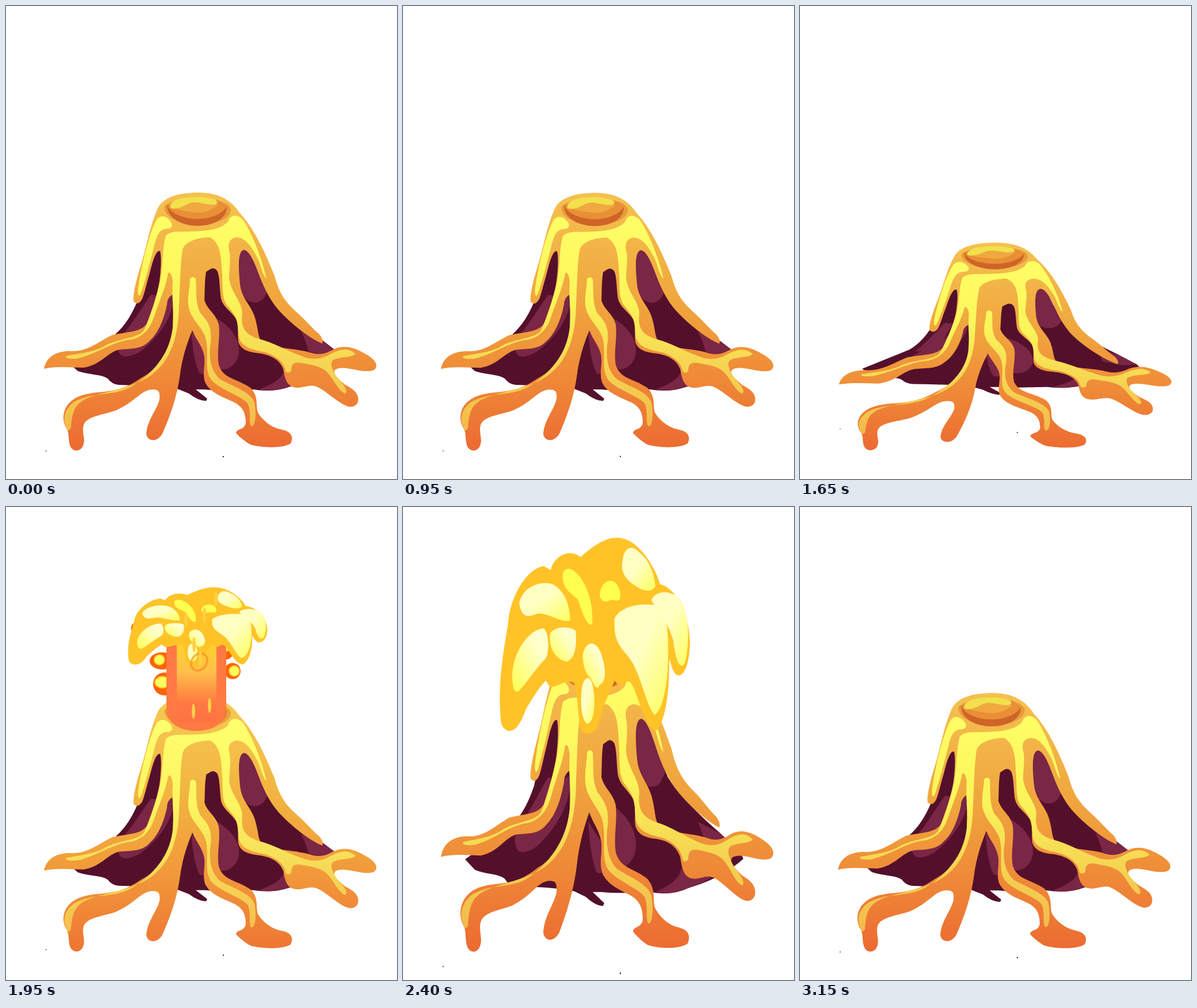
Recreate the animation shown at these times as an HTML page. Size 680 by 824 pixels, loop 3.2 s.

```html
<!DOCTYPE html>
<html lang="en">
<head>
<meta charset="utf-8">
<title>Volcano</title>
<style>
html, body { margin: 0; width: 100%; height: 100%; overflow: hidden; background: #fff; }
svg { display: block; width: 100%; height: 100%; }
</style>
</head>
<body>
<svg viewBox="0 0 680 824">
  <defs>
    <linearGradient id="lavaFill" gradientUnits="userSpaceOnUse" x1="0" y1="325" x2="0" y2="770">
      <stop offset="0"/><stop offset=".4"/><stop offset=".7"/><stop offset="1"/>
    </linearGradient>
    <linearGradient id="shineFill" gradientUnits="userSpaceOnUse" x1="0" y1="360" x2="0" y2="745">
      <stop offset="0"/><stop offset=".4"/><stop offset=".7"/><stop offset="1"/>
    </linearGradient>
    <linearGradient id="jetFill" x1="0" y1="0" x2="0" y2="1">
      <stop offset="0" stop-color="#ffd22e"/><stop offset=".35" stop-color="#ffc04a"/><stop offset=".75" stop-color="#ff7a42"/><stop offset="1" stop-color="#ff7242"/>
    </linearGradient>
    <linearGradient id="paleFill" x1="1" y1="0" x2="0" y2="1">
      <stop offset=".3" stop-color="#ffffcc"/><stop offset="1" stop-color="#ffff50"/>
    </linearGradient>
    <linearGradient id="paleFill2" x1="0" y1="0" x2="1" y2="1">
      <stop offset=".45" stop-color="#ffffc4"/><stop offset="1" stop-color="#ffff5c"/>
    </linearGradient>
  </defs>

  <g id="rock">
    <path fill="#54102b" d="M262 385C250 425 240 470 228 515C220 535 208 556 190 572L108 621L125 636C145 643 165 641 177 649Q184 659 196 660C230 661 265 661 298 667L318 675Q335 688 348 688L350 684L330 668L345 668C380 671 405 668 430 668Q465 674 497 662Q555 648 592 620L586 610L550 582Q522 562 500 543Q476 524 460 502L440 457Q430 425 420 385Z"/>
    <g fill="#7a2645">
      <path d="M398 410C402 470 404 495 414 507C424 520 442 519 449 508L456 496L440 455L425 410Z"/>
      <path d="M513 567L552 584L586 610L560 612L526 602Q523 586 513 567Z"/>
      <path d="M440 668C465 658 480 650 484 634L540 645Q520 656 497 662Q465 674 440 668Z"/>
      <path d="M362 542C393 558 410 585 404 610C398 629 380 638 368 630Z"/>
      <path d="M322 566L345 596L352 636Q345 643 337 640Q326 620 322 566Z"/>
      <path d="M293 500C292 540 268 572 244 593C228 609 205 615 199 607Q193 600 195 588L250 545L280 505Z"/>
      <path d="M252 503L226 542Q212 562 200 577L240 570L266 505Z"/>
    </g>
    <path id="speckL" fill="#54102b" d="M69 774.500h1.500v1.500h-1.500z"/>
    <path fill="#54102b" d="M377 784h2v2h-2z"/>
  </g>

  <g id="lava">
    <path fill="url(#lavaFill)" d="M262 357C270 333 300 325 335 325C372 325 393 340 406 360C432 388 450 428 467 470C475 500 485 515 505 533C520 546 533 562 545 572Q553 582 550 588C530 580 500 557 480 536C462 518 450 495 440 468C430 440 421 424 413 425C403 428 404 455 407 485C410 510 425 520 432 540C440 565 437 575 445 585C460 597 500 595 530 604C550 610 560 603 572 597C590 590 606 595 625 606C645 617 648 628 640 634C620 642 590 624 573 633C566 640 578 650 590 660C605 668 615 675 612 690C605 704 590 697 580 690C565 680 552 668 540 663C525 658 515 668 500 664C485 660 484 640 482 632C475 615 460 608 440 605C420 603 408 598 404 585C402 570 406 560 400 545C390 530 378 525 374 510C371 490 372 470 367 461Q362 455 356 458L348 463C345 480 346 500 345 512C350 530 365 535 370 555C373 580 366 600 370 625C378 650 400 648 425 665C440 680 434 695 438 708C446 722 462 735 480 738C498 742 500 752 495 762C480 772 440 769 425 764C415 758 405 750 400 744C402 735 413 740 417 727C417 712 414 700 398 691C380 682 355 675 346 655C340 635 350 620 342 600C336 585 330 580 324 565C318 580 308 605 303 640C298 680 285 715 272 745C262 762 245 758 244 745C246 720 262 705 267 685C268 672 266 668 255 668C235 668 225 690 190 705C165 713 140 715 135 730C131 745 140 755 133 768C128 777 115 777 111 765C108 755 110 745 106 737C98 725 98 710 105 698C115 683 130 676 160 673C195 670 210 665 235 648C265 633 285 600 290 560C291 540 292 520 289 503C284 506 280 512 280 520C275 545 265 570 250 583C235 600 215 596 195 599C175 605 165 625 135 630C110 630 90 627 66 632C70 612 85 602 110 601C140 604 160 585 185 573C215 567 235 568 245 553C255 525 265 500 268 470C270 450 270 435 268 427C262 424 256 440 250 465C244 485 241 500 237 510Q230 523 222 515C220 505 226 480 232 460C245 420 248 390 262 357Z"/>
    <g fill="url(#shineFill)">
      <path d="M262 372C270 362 281 367 288 378Q291 388 280 388C266 388 262 402 258 417C252 442 244 472 236 497C232 510 228 505 230 490C236 450 248 398 262 372Z"/>
      <path d="M278 400Q285 393 300 393C340 393 370 392 386 376C390 362 402 362 412 372C430 400 445 440 453 475C447 470 444 455 438 440C425 415 415 403 400 403C390 405 385 412 388 425C392 440 388 455 388 475C392 500 410 515 411 535C408 560 415 572 440 580C470 588 490 602 520 612C540 618 555 612 565 606C580 598 595 594 608 606C600 613 585 610 570 616C560 622 570 640 580 652C590 662 595 672 590 675C580 672 572 655 562 642C552 628 535 626 515 622C495 618 497 630 496 636Q490 642 486 636C484 620 470 610 450 603C420 598 405 590 404 570C403 545 400 540 385 522C375 510 377 490 376 470C374 440 375 415 355 403C330 403 310 412 307 425C303 450 303 480 301 520C300 580 285 620 250 645C220 665 180 670 150 680C120 690 115 705 113 735Q108 745 104 732C97 715 105 700 118 690C150 672 185 680 215 665C250 645 285 610 290 560C292 530 288 500 290 480Q288 462 282 465C278 490 268 510 258 540C250 565 235 580 210 582C180 588 160 605 125 614Q103 616 104 610C120 606 150 604 170 593C195 578 230 580 240 565C252 540 262 505 268 480C273 450 272 420 278 400Z"/>
      <path d="M320 475Q325 469 330 475C332 495 328 515 338 535C352 550 358 560 356 585C352 610 355 635 372 650C395 663 425 672 432 690C436 710 434 732 427 732C421 728 427 705 420 692C408 678 370 668 356 650C343 630 355 600 346 575C338 555 320 545 317 520C316 500 320 490 320 475Z"/>
    </g>
    <path fill="#e89a38" d="M275 350Q279 344 290 341Q332 325 376 341Q390 346 391 355C388 390 277 390 275 350Z"/>
    <path fill="#cf6428" d="M280 347C281 395 386 394 384 349Z"/>
    <path fill="#e98f35" d="M281 349Q300 333 332 332Q370 334 384 349C368 378 298 378 281 349Z"/>
    <path fill="#f0a840" d="M288 352Q315 342 336 343L370 346C360 354 350 360 332 360Q310 358 288 352Z"/>
    <path fill="#f2e04c" d="M286 352Q283 343 300 336Q335 328 364 337Q372 344 362 346C345 347 335 339 318 344Q303 353 290 353Z"/>
    <path id="craterGlow" fill="#ffe23c" d="M275 350Q279 344 290 341Q332 325 376 341Q390 346 391 355C388 390 277 390 275 350Z"/>
  </g>

  <g id="bombs"></g>

  <g id="jet">
    <path id="jetSide" fill="#ff7a42"/>
    <rect id="jetCore" x="297" width="69" fill="url(#jetFill)"/>
  </g>

  <g id="cloud">
    <path fill="#ffc327" d="M170 190C165 160 172 130 183 95C185 70 215 40 245 38L257 42C262 28 290 20 309 29C330 18 355 8 378 10C410 12 440 40 447 56C475 60 498 85 499 115C498 140 485 150 475 146C468 142 466 135 463 130C464 165 455 195 440 202C425 200 415 180 405 165C398 152 390 150 385 156Q378 160 368 152C360 165 350 172 343 190C335 208 312 210 307 195C304 180 303 165 298 155C285 148 270 160 255 158L248 152C235 160 225 170 214 180C205 195 195 203 183 202C174 200 170 196 170 190Z"/>
    <g fill="url(#paleFill2)">
      <path d="M202 75C208 58 240 52 260 56C280 62 290 75 291 92C275 95 255 85 235 85C222 88 207 92 202 75Z"/>
      <path d="M382 32C385 18 400 17 410 24C425 30 436 42 439 58C430 66 415 62 400 56C385 50 378 42 382 32Z"/>
      <path d="M432 72C440 60 475 62 487 75C497 90 499 115 490 135C480 142 474 130 470 112C462 95 445 85 432 72Z"/>
      <path d="M368 90C380 76 425 74 445 78C460 88 462 105 461 130C460 160 450 182 438 186C425 180 418 155 400 135C385 120 365 118 368 90Z"/>
      <path d="M311 160C314 147 327 145 331 160C336 180 330 195 320 195C310 190 308 175 311 160Z"/>
    </g>
    <g fill="url(#paleFill)">
      <path d="M190 150C188 125 220 100 245 100C255 105 254 125 248 130C230 140 215 155 200 163C192 163 191 158 190 150Z"/>
      <path d="M256 105C265 97 290 98 300 102C303 115 300 130 285 133C270 132 252 122 256 105Z"/>
      <path d="M313 125C320 110 340 112 347 130C355 145 350 155 342 156C335 165 330 150 322 147C314 140 312 132 313 125Z"/>
    </g>
    <g fill="#ffff50">
      <path d="M278 45C285 36 300 42 312 52C325 65 331 80 329 96C320 98 312 85 305 72C295 65 275 62 278 45Z"/>
      <path d="M342 68C343 52 365 48 374 58C382 68 378 74 368 72C358 70 350 78 342 68Z"/>
    </g>
  </g>

  <g id="sparks">
    <ellipse id="ring" cx="336" rx="13" ry="16" fill="none" stroke="#f08a20" stroke-opacity=".6" stroke-width="4"/>
  </g>
</svg>

<script>
const LOOP = 3200, STEP = 50;
const $ = id => document.getElementById(id);
const mix = (a, b, p) => a + (b - a) * p;

// Rows of [time, value, value...], read with straight lines between them.
function sample(rows, t) {
  let i = 1;
  while (i < rows.length - 1 && rows[i][0] < t) i++;
  const a = rows[i - 1], b = rows[i];
  const p = Math.min(1, Math.max(0, (t - a[0]) / (b[0] - a[0])));
  return a.slice(1).map((v, n) => mix(v, b[n + 1], p));
}

// time, lava height, rock height
const SQUASH = [
  [1000, 1, 1], [1100, .973, .965], [1250, .93, .875], [1650, .805, .677],
  [1700, .8, .67], [1800, .87, .78], [2000, 1.03, 1.03], [2200, 1.126, 1.155],
  [2300, 1.185, 1.25], [2400, 1.161, 1.21], [2750, 1.045, 1.07], [3150, 1.002, 1], [3200, 1, 1]
];
// time, width, top, height
const CLOUD = [
  [1750, .3, 330, .3], [1900, .65, 180, .6], [2050, .9, 60, .9], [2200, 1, 10, 1],
  [2250, 1, 8, 1.05], [2300, 1, 22, 1.3], [2400, 1, 54, 1.75], [2500, .9, 150, 1.4], [2600, .6, 290, .6]
];
// x, y, rx, ry, core dx, core dy, core rx, core ry
const BOMBS = [
  [100, 263, 27, 16, -10, -2, 12, 9], [173, 415, 22, 15, -5, -2, 9, 9],
  [184, 522, 20, 20, -4, -3, 13, 10], [557, 237, 10, 9, 0, -6, 9, 9],
  [467, 361, 15, 18, -1, -5, 9, 9], [499, 462, 14, 14, 3, 0, 9, 9]
];
// x, height above the crater lip
const SPARKS = [[301, 103], [328, 101], [365, 86], [313, 50], [345, 57], [327, 6], [338, 253], [354, 170], [326, 160]];

const LAVA = [["#f5c150", "#f9e05c"], ["#f0a83e", "#f7cb46"], ["#ef8c38", "#f5b53e"], ["#ec6b32", "#f4903a"]];
const SHINE = [["#ffff66", "#ffff80"], ["#fbf45a", "#fdf66c"], ["#f5d452", "#f9e45e"], ["#f2b84a", "#f7cc50"]];

function blend(pair, p) {
  const [a, b] = pair.map(c => [1, 3, 5].map(i => parseInt(c.substr(i, 2), 16)));
  return `rgb(${a.map((v, i) => Math.round(mix(v, b[i], p)))})`;
}
function tint(id, pairs, p) {
  pairs.forEach((pair, i) => $(id).children[i].setAttribute("stop-color", blend(pair, p)));
}
function add(parent, name, attrs) {
  const el = document.createElementNS("http://www.w3.org/2000/svg", name);
  for (const k in attrs) el.setAttribute(k, attrs[k]);
  return parent.appendChild(el);
}
function show(id, on) { $(id).setAttribute("visibility", on ? "visible" : "hidden"); }

const bombs = BOMBS.map(([, , rx, ry, dx, dy, cx, cy]) => {
  const g = add($("bombs"), "g", {});
  add(g, "ellipse", { rx, ry, fill: "#ff6200" });
  add(g, "ellipse", { cx: dx, cy: dy, rx: cx, ry: cy, fill: "#ffff5c", stroke: "#ffc02c", "stroke-width": 2 });
  return g;
});
const sparks = SPARKS.map(([cx]) => add($("sparks"), "ellipse", { cx, rx: 3, ry: 13, fill: "#ffd045" }));

function pose(t) {
  if (t >= 1000) return sample(SQUASH, t);
  const dip = Math.sin(Math.PI * t / 1000) ** 2;
  return [1 - .056 * dip, 1 - .075 * dip];
}

function drawJet(t, lip, top, wide) {
  const on = t >= 1750 && t < 2350;
  show("jet", on);
  show("sparks", on && t >= 1900 && t < 2300);
  if (!on) return;
  const w = t > 2250 ? mix(1, .3, (t - 2250) / 100) : Math.min(1, wide + .3);
  const base = lip - 35, from = Math.min(top, base - 5);
  $("jet").setAttribute("transform", `translate(${331 * (1 - w)}) scale(${w} 1)`);
  $("jetSide").setAttribute("d", `M279 ${from}V${base}C283 ${lip + 11} 379 ${lip + 11} 383 ${base}V${from}Z`);
  $("jetCore").setAttribute("y", from);
  $("jetCore").setAttribute("height", lip - 16 - from);
  $("ring").setAttribute("cy", top + 32);
  $("ring").setAttribute("transform", `rotate(35 336 ${top + 32})`);
  sparks.forEach((el, i) => {
    const rise = (SPARKS[i][1] + (t - 2200) * .5 + 540) % 270;
    el.setAttribute("cy", lip - rise);
    el.setAttribute("visibility", lip - rise > top - 80 ? "inherit" : "hidden");
  });
}

function draw(t) {
  const [s, k] = pose(t);
  const lean = -Math.max(0, 1 - s) * 30 / 447;
  $("lava").setAttribute("transform", `matrix(1 0 ${lean} ${s} ${-lean * 772} ${772 * (1 - s)})`);
  $("rock").setAttribute("transform", `matrix(1 0 0 ${k} 0 ${655 * (1 - k)})`);

  const beat = (t % 1600 - 300) / 500;
  const glow = beat > 0 && beat < 1 ? Math.sin(Math.PI * beat) : 0;
  tint("lavaFill", LAVA, glow);
  tint("shineFill", SHINE, glow);
  $("craterGlow").setAttribute("opacity", glow * .35);
  show("speckL", glow < .5);

  const [wide, top, tall] = sample(CLOUD, t);
  show("cloud", t >= 1750 && t <= 2600);
  $("cloud").setAttribute("transform", `matrix(${wide} 0 0 ${tall} ${333 * (1 - wide)} ${top - 10 * tall})`);
  drawJet(t, 772 - 385 * s, top + 140 * tall, wide);

  const p = (t - 1800) / 400;
  show("bombs", p > .15 && p <= 1.25);
  bombs.forEach((g, i) => {
    const [x, y] = BOMBS[i];
    g.setAttribute("transform", `translate(${mix(331, x, p)} ${mix(270, y, p) - 240 * p * (1 - p)})`);
  });
}

const start = performance.now();
function tick() {
  const t = (performance.now() - start) % LOOP;
  draw(Math.floor(t / STEP) * STEP);
  requestAnimationFrame(tick);
}
tick();
</script>
</body>
</html>
```
